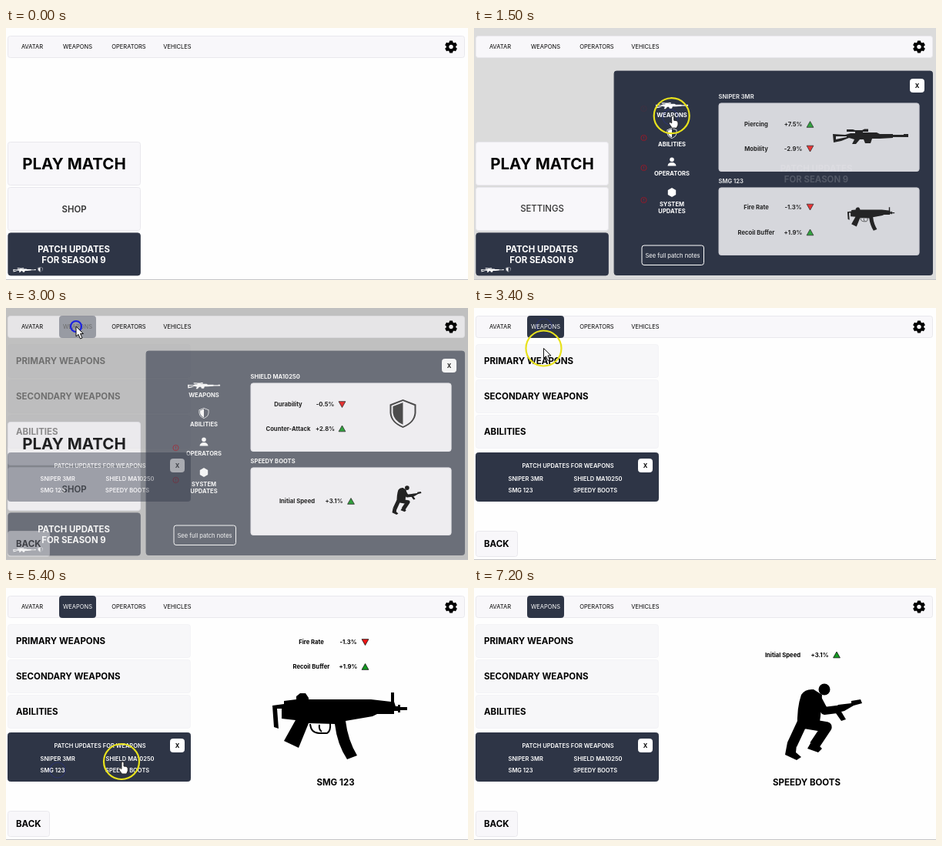
These frames come from a looping animation (600 by 328 pixels, 8 s). An HTML page:

```html
<!DOCTYPE html>
<html lang="en">
<head>
<meta charset="utf-8">
<title>Game menu walkthrough</title>
<style>
html, body { margin: 0; width: 100%; height: 100%; overflow: hidden; background: #fff; }
svg { display: block; width: 600px; height: 328px; font-family: Inter, Roboto, sans-serif; }
</style>
</head>
<body>
<svg id="stage" viewBox="0 0 600 328" xmlns="http://www.w3.org/2000/svg"></svg>
<script>
const LOOP = 8000, STEP = 100;
const DARK = '#2e3546', CARD = '#f8f7fa', EDGE = '#e9e8ed', TINT = 'rgba(40,30,90,.03)';
const stage = document.getElementById('stage');

// Markup helpers; y in text() is the middle of the capitals.
const text = (x, y, s, size, weight = 700, fill = '#000', anchor = 'middle') =>
  `<text x="${x}" y="${y + size * 0.364}" font-size="${size}" font-weight="${weight}" fill="${fill}" text-anchor="${anchor}">${s}</text>`;
const box = (x1, y1, x2, y2, fill = CARD, stroke = EDGE) =>
  `<rect x="${x1 + .5}" y="${y1 + .5}" width="${x2 - x1 - 1}" height="${y2 - y1 - 1}" rx="3" fill="${fill}" stroke="${stroke}"/>`;
const dark = (...r) => box(...r, DARK, DARK);
const group = (id, body) => `<g id="${id}">${body}</g>`;
const place = (body, x, y, s, color = '#000') =>
  `<g transform="translate(${x} ${y}) scale(${s})" fill="${color}" stroke="none">${body}</g>`;

// Artwork, each centred on its own zero point.
const art = {
  sniper: `<path fill-rule="evenodd" d="M-49 -3L-33 -2L-26 -4H-20L-18 -5H8L12 -3H29V-2H43V-3H49V1H29V2L12 3H2L0 9H-7L-9 4H-14L-19 10H-24L-21 4L-28 2L-38 6L-48 8ZM-45 0V4L-31 1V0Z"/><path d="M-31 -9H-23L-20 -8H-11L-8 -9.5H-3V-6H-10V-4H-20V-6H-31Z"/>`,
  smg: `<g transform="translate(-432 -179)"><path d="M346 153L361 151V147L377 145V141L382 137H389L393 143V145H474L500 148V136H504V148L506 154H509V152H512V155H521V159H512V162H509V160H504V164H482L476 167L441 173Q444 198 456 218L443 223Q430 203 427 177L393 176L380 208L361 199L376 172L358 170V157H352L354 183L348 181Z"/><path d="M395 177Q396 189 407 189H417Q422 186 421 176M407 178Q406 184 410 187" fill="none" stroke="#000" stroke-width="2"/></g>`,
  runner: `<g transform="translate(-454 -174)"><circle cx="455" cy="132" r="7.5"/><path d="M425 139Q430 131 441 132L452 139L450 167L448 181L420 182Q419 156 425 139ZM407 201L419 204L418 214L425 220L419 224L404 217ZM437 202L447 204L452 209L447 214L433 209ZM461 161L473 152L490 150V147L502 145L504 150L493 153L481 160L477 161L483 171L477 173L470 163Z"/><path d="M428 176L458 181L442 205M426 176L413 204" fill="none" stroke="#000" stroke-width="13.5" stroke-linejoin="round"/><path d="M446 143L455 160L471 158" fill="none" stroke="#000" stroke-width="10" stroke-linejoin="round" stroke-linecap="round"/></g>`,
  shield: `<path fill-rule="evenodd" d="M0 -18.5L17 -12V-1Q16 12 0 18.5Q-16 12 -17 -1V-12ZM0 -16.5L15 -10.5V-1Q14 11 0 16.5Q-14 11 -15 -1V-10.5ZM0 -14.5V14.3Q-12 9 -13 -1V-9.5Z"/>`,
  person: `<circle cy="-2.7" r="2.8"/><path d="M-5.5 5.5Q-5 1 0 1Q5 1 5.5 5.5Z"/>`,
  hex: `<path d="M0 -6L5.2 -3V3L0 6L-5.2 3V-3Z"/>`
};

const tri = (x, y, up) => {
  const d = up ? 1 : -1;
  return `<path d="M${x} ${y - 4 * d}L${x + 4.4} ${y + 3.8 * d}H${x - 4.4}Z" fill="${up ? '#129a20' : '#f01414'}" stroke="#111" stroke-width=".8"/>`;
};
const stat = (x, y, [name, value]) =>
  text(x, y, name, 7.7, 700) + text(x + 48, y, value, 7.7, 700) + tri(x + 70, y, value[0] === '+');

const gear = () => {
  let teeth = '';
  for (let a = 0; a < 360; a += 60) teeth += `<path d="M-2.7 -5L-1.9 -8H1.9L2.7 -5Z" transform="rotate(${a})"/>`;
  return `<g transform="translate(578 24.5)">${teeth}<circle r="4.5" fill="none" stroke="#000" stroke-width="3.4"/></g>`;
};

const items = [
  { name: 'SNIPER 3MR', art: 'sniper', color: '#000', tab: [515, 141, 1], view: 1.75, at: [44.5, 222], open: 4350,
    stats: [['Piercing', '+7.5%'], ['Mobility', '-2.9%']] },
  { name: 'SMG 123', art: 'smg', color: '#000', tab: [515, 248.3, .35], view: 1, at: [44.5, 237.5], open: 5050,
    stats: [['Fire Rate', '-1.3%'], ['Recoil Buffer', '+1.9%']] },
  { name: 'SHIELD MA10250', art: 'shield', color: '#333', tab: [515.5, 137.5, 1], view: 2.5, at: [129.5, 222], open: 5950,
    stats: [['Durability', '-0.5%'], ['Counter-Attack', '+2.8%']] },
  { name: 'SPEEDY BOOTS', art: 'runner', color: '#000', tab: [520.5, 250, .38], view: 1, at: [129, 237.5], open: 6650,
    stats: [['Initial Speed', '+3.1%']] }
];

const tabEntry = (it, lower) => {
  const top = lower ? 199 : 89.5, one = it.stats.length === 1;
  const rows = one ? [251.5] : lower ? [233, 266] : [125.5, 157];
  return text(317.5, top, it.name, 7.6, 700, '#fff', 'start') +
    it.stats.map((s, i) => stat(one ? 378 : 366.5, rows[i], s)).join('') +
    place(art[it.art], ...it.tab, it.color);
};
const view = it => {
  const one = it.stats.length === 1;
  return it.stats.map((s, i) => stat(one ? 401 : 396.5, one ? 87 : 70.5 + 32 * i, s)).join('') +
    place(art[it.art], one ? 454 : it.art === 'smg' ? 432 : 428, one ? 174 : 179, it.view, it.color) +
    text(one ? 432 : 428, 253, it.name, 11.5);
};

// Panel menu: label lines, label y, icon, icon y, icon scale, dot y, hover spans.
const menu = [
  [['WEAPONS'], 113.5, 'sniper', 101, .43, 105, [[1100, 1300]]],
  [['ABILITIES'], 151, 'shield', 137, .38, 143, [[900, 1100], [1900, 2050]]],
  [['OPERATORS'], 189, 'person', 174, 1, 182, []],
  [['SYSTEM', 'UPDATES'], 229, 'hex', 214, 1, 224, []]
];
const menuItem = ([lines, y, icon, iy, s, dy], i) =>
  `<rect id="hover${i}" x="229" y="${y - 25.5}" width="55.5" height="38" rx="3" fill="#f8f7fa"/>` +
  group('menu' + i, place(art[icon], 257, iy, s, 'currentColor') +
    lines.map((l, n) => text(257, y + n * 9.3, l, 7.6, 700, 'currentColor')).join('')) +
  group('dot' + i, `<circle cx="220.5" cy="${dy}" r="3.6" fill="none" stroke="#941a2a"/><path d="M220.5 ${dy - 2}v2.2m0 1v1" stroke="#941a2a"/>`);

const patch = (x, y) => text(x, y, 'PATCH UPDATES', 11.4, 700, '#fff') + text(x, y + 14, 'FOR SEASON 9', 11.4, 700, '#fff');
const nav = [['AVATAR', 34], ['WEAPONS', 93], ['OPERATORS', 159.5], ['VEHICLES', 222.5]];
const close = (x, y) => box(x, y, x + 19, y + 18, '#fff', '#fff') + text(x + 9.5, y + 9.2, 'X', 7.6);

stage.innerHTML =
  '<rect id="back" width="600" height="328"/>' +
  group('bar', box(2, 10, 596, 39)) + nav.map(([s, x]) => text(x, 24.5, s, 7.5, 400)).join('') + gear() +
  group('home',
    box(2, 148, 175, 205) + text(88.5, 176.5, 'PLAY MATCH', 20.5) +
    box(2, 207, 175, 264) + group('shop', text(88.5, 235.5, 'SHOP', 11.4, 600, '#333')) +
    group('settings', text(88.5, 235, 'SETTINGS', 11.4, 500, '#333')) +
    group('cardPlate', dark(2.4, 266.4, 174.8, 322.4)) + patch(88, 287.5) +
    place(art.sniper, 24, 315, .3, '#fff') + place(art.shield, 44.5, 314.5, .19, '#fff')) +
  group('panel',
    group('panelPlate', dark(181.6, 55.6, 596, 322)) + close(566, 66) + menu.map(menuItem).join('') +
    box(217.5, 282.5, 299, 309, 'none', '#fff') + text(258, 296, 'See full patch notes', 7.6, 400, '#fff') +
    group('message', patch(444.5, 182.5)) +
    group('cards', box(317.5, 97.4, 578.6, 187) + box(317.5, 207.4, 578.6, 296)) +
    group('tabWeapons', tabEntry(items[0], false) + tabEntry(items[1], true)) +
    group('tabAbilities', tabEntry(items[2], false) + tabEntry(items[3], true))) +
  group('page',
    dark(69, 10, 117, 39) + text(93, 24.5, 'WEAPONS', 7.5, 400, '#fff') +
    ['PRIMARY WEAPONS', 'SECONDARY WEAPONS', 'ABILITIES'].map((s, i) =>
      box(2, 47 + 46 * i, 240, 91 + 46 * i, TINT, TINT) + text(13, 68.5 + 46 * i, s, 11.5, 700, '#000', 'start')).join('') +
    dark(2, 188, 240, 252) + text(122, 205, 'PATCH UPDATES FOR WEAPONS', 7.5, 600, '#fff') + close(213, 196) +
    items.map((it, i) => group('link' + i, text(...it.at, it.name, 7.5, 600, '#fff', 'start'))).join('') +
    box(2, 290, 57, 324) + text(13, 307, 'BACK', 11.5, 700, '#000', 'start')) +
  items.map((it, i) => group('view' + i, view(it))).join('') +
  '<rect y="327" width="600" height="1" fill="#c4c4c6"/>' +
  '<circle id="trace" r="10" fill="none" stroke="#2a35d8" stroke-width="1.2" opacity=".25"/>' +
  group('pointer', '<circle id="ring" fill="none" stroke-width="2.2"/>' +
    '<path id="arrow" d="M0 0V13L3 10.3L5.5 16L8 15L5.5 9.5H9.5Z" fill="#fff" stroke="#111"/>' +
    '<path id="hand" d="M0 1Q2 -1 3 1V6Q8 6 8.3 9V12L6.5 16H0.5L-3.5 10Q-3 7.5 0 9.5Z" fill="#fff" stroke="#222"/>');

const el = {};
stage.querySelectorAll('[id]').forEach(e => el[e.id] = e);
const fade = (id, o) => el[id].setAttribute('opacity', o);
const ramp = (t, start, span) => Math.min(1, Math.max(0, (t - start) / span));
const within = (t, [a, b]) => t >= a && t < b;

// Pointer stops: time, x, y.
const path = [
  [200, -30, 288], [450, 28, 275], [700, 28, 275], [1000, 253, 117], [1600, 257, 114],
  [2000, 263, 137], [2300, 263, 137], [2800, 91, 24], [3250, 91, 24], [3800, 88, 180],
  [4200, 72, 223], [4550, 72, 223], [4900, 67, 237], [5150, 67, 237], [5400, 150, 226],
  [5900, 152, 222], [6200, 152, 222], [6500, 152, 237], [6800, 152, 237], [7150, 190, -30]
];
const clicks = [[500, 28, 275], [1200, 255, 116], [2050, 263, 137], [2950, 91, 24],
  [4250, 72, 223], [5000, 67, 237], [5900, 152, 222], [6600, 152, 237]];

function pointerAt(t) {
  let i = 0;
  while (i < path.length - 2 && t >= path[i + 1][0]) i++;
  const [a, x, y] = path[i], [b, u, v] = path[i + 1];
  const k = ramp(t, a, b - a), e = k * k * (3 - 2 * k);
  return [x + (u - x) * e, y + (v - y) * e];
}

function draw(t) {
  const open = ramp(t, 550, 200), weapons = ramp(t, 1250, 300);
  const abilities = ramp(t, 2064, 300), page = ramp(t, 2874, 300);

  // The canvas darkens in the middle of each screen dissolve.
  const level = [weapons, abilities, page].reduce((l, p) => l - p * (1 - p), 1);
  const g = Math.round(254 * level);
  el.back.setAttribute('fill', `rgb(${g},${g},${g})`);
  fade('bar', 1 - 1.3 * page * (1 - page));

  // Leaving content lingers while the dark plates fade linearly.
  const content = 1 - page * page, plate = 1 / (1 + page);
  const settings = weapons >= .5 && abilities < .5 ? 1 : 0;
  fade('home', content);
  fade('cardPlate', plate);
  fade('panelPlate', plate);
  fade('shop', 1 - settings);
  fade('settings', settings);
  fade('panel', open * content);
  fade('message', 1 - weapons);
  fade('cards', weapons);
  fade('tabWeapons', weapons * (1 - abilities));
  fade('tabAbilities', abilities);
  fade('page', page);

  menu.forEach((m, i) => {
    const on = m[6].some(s => within(t, s));
    fade('hover' + i, on ? 1 : 0);
    el['menu' + i].style.color = on ? '#222' : '#fff';
    fade('dot' + i, i === 0 ? 1 - weapons : i === 1 ? 1 - abilities : 1);
  });

  items.forEach((it, i) => {
    const next = items[i + 1];
    fade('view' + i, ramp(t, it.open, 200) * (next ? 1 - ramp(t, next.open, 200) : 1));
    fade('link' + i, within(t, [it.open - 150, it.open + 50]) ? .35 : 1);
  });

  const [x, y] = pointerAt(t);
  const pressed = clicks.some(c => within(t, [c[0] - 50, c[0] + 150]));
  fade('pointer', within(t, [200, 7150]) ? 1 : 0);
  el.pointer.setAttribute('transform', `translate(${x} ${y})`);
  el.ring.setAttribute('r', pressed ? 7 : 23);
  el.ring.setAttribute('stroke', pressed ? '#1c22e0' : '#e8e21c');
  const arrow = within(t, [2400, 3800]) || t >= 6800;
  fade('arrow', arrow ? 1 : 0);
  fade('hand', arrow ? 0 : 1);

  const last = clicks.find(c => within(t, [c[0] + 150, c[0] + 550]));
  fade('trace', last ? .25 : 0);
  if (last) el.trace.setAttribute('transform', `translate(${last[1]} ${last[2]})`);
}

const begin = performance.now();
function tick() {
  const t = (performance.now() - begin) % LOOP;
  draw(Math.floor(t / STEP) * STEP);
  requestAnimationFrame(tick);
}
tick();
</script>
</body>
</html>
```
